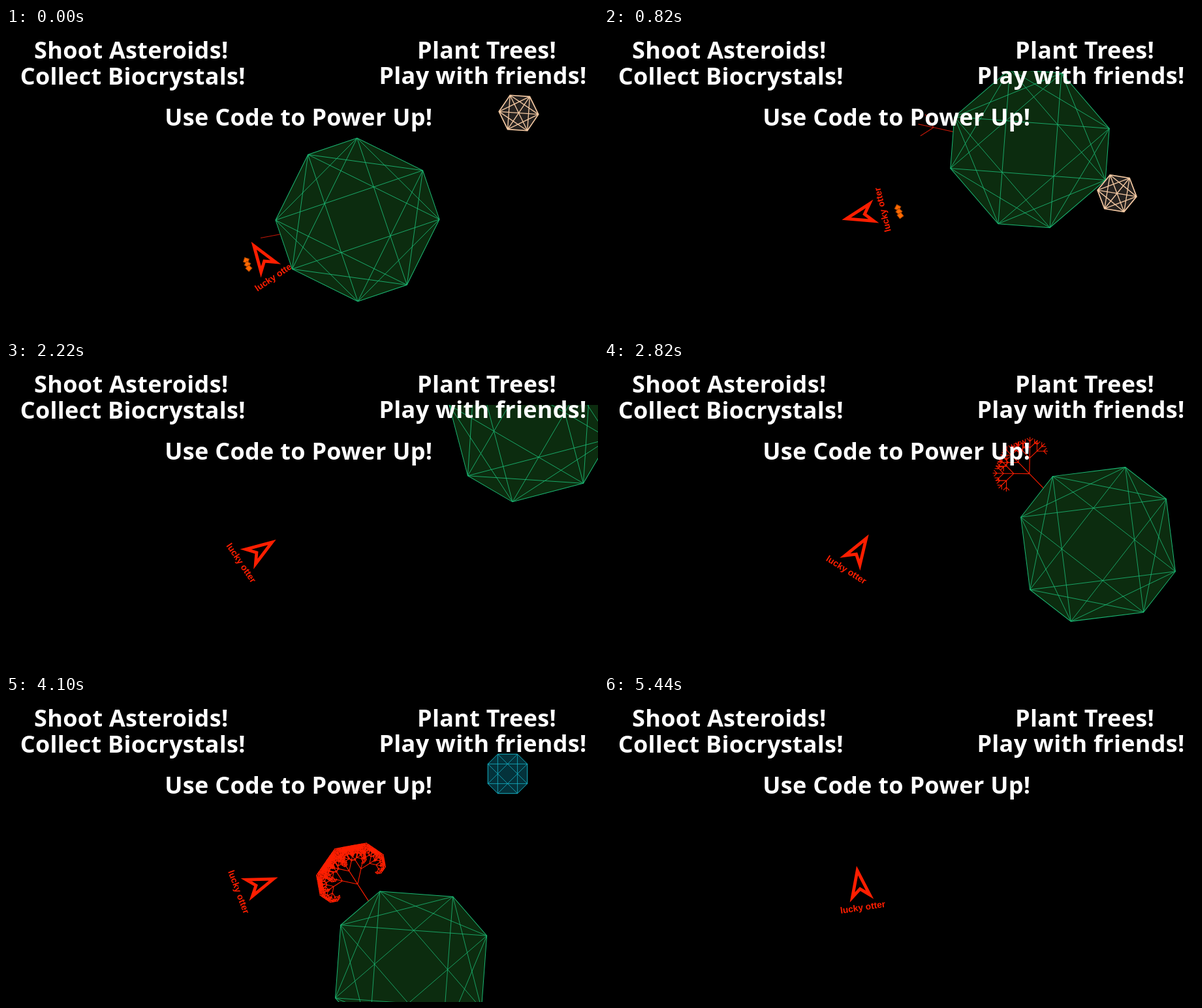
Recreate the animation shown at these times as an HTML page with a canvas. Size 907 by 470 pixels, loop 5.46 s.

```html
<!DOCTYPE html>
<html lang="en">
<head>
<meta charset="utf-8">
<title>Asteroid game</title>
<style>
  html, body { margin: 0; width: 100%; height: 100%; overflow: hidden; background: #000; }
  canvas { display: block; }
</style>
</head>
<body>
<canvas id="stage" width="907" height="470"></canvas>
<script>
const ctx = document.getElementById('stage').getContext('2d');
const WIDTH = 907, HEIGHT = 470, TOP = 66;
const LOOP = 5460, STEP = 20, RAD = Math.PI / 180;
const HIT = 820;            // the rock strikes the planet
const CRYSTAL_IN = 3820;    // the crystal enters from above
const RED = '#ff1e00';

// Waypoints: time, then values.
const planetPath = [
  [0, 538.5, 231.5], [820, 652.5, 185], [1440, 759.8, 138], [2220, 801.8, 92],
  [2820, 757, 280], [3340, 724, 324], [4100, 620.6, 416], [5060, 370, 550], [5440, 345, 700]
];
const shipTurns = [
  [0, -34], [820, -104], [1440, -156], [2220, -304], [3340, -335.5], [4100, -290.5], [5440, -368.5]
];

// Smooth curve through the waypoints, without overshoot.
function follow(points, t) {
  const last = points.length - 1;
  if (t >= points[last][0]) return points[last].slice(1);
  const i = points.findIndex(p => p[0] > t) - 1;
  const a = points[i], b = points[i + 1], h = b[0] - a[0];
  const u = (t - a[0]) / h, w = 1 - u;
  const rate = (n, c) => (points[n + 1][c] - points[n][c]) / (points[n + 1][0] - points[n][0]);
  const slope = (n, c) => {
    const p = rate(Math.max(n - 1, 0), c), q = rate(Math.min(n, last - 1), c);
    return p * q > 0 ? 2 * p * q / (p + q) : 0;
  };
  return a.slice(1).map((v, k) => {
    const c = k + 1;
    return v * (1 + 2 * u) * w * w + b[c] * u * u * (3 - 2 * u)
      + h * (slope(i, c) * u * w * w - slope(i + 1, c) * u * u * w);
  });
}

// The view settles upward at the start.
const settle = t => 63 * Math.max(0, 1 - t / 400) ** 2;

function planetPose(t) {
  const [x, y] = follow(planetPath, t);
  return [x, y + settle(t), 26.3 + 86 * (1 - Math.exp(-t * 0.00038))];
}

function rockPose(t) {
  const turn = 4 + t * 0.0064;
  if (t < HIT) return [785.5, 67.5 + t * 0.2275 + settle(t), turn];
  const drift = (t - HIT) / 620;
  return [786 + 27.5 * drift ** 2.2, 254 + 15 * drift, turn];
}

const crystalPose = t => [768.5 - (t - 4100) * 0.35, 119.5 + (t - 4100) * 0.31, 0];

const octagon = Array.from({ length: 8 }, (_, i) => {
  const angle = (Math.floor(i / 2) * 90 + (i % 2 ? 1 : -1) * 26.565) * RAD;
  return [Math.cos(angle), Math.sin(angle)];
});
const hexagon = Array.from({ length: 6 }, (_, i) => [Math.cos(i * 60 * RAD), Math.sin(i * 60 * RAD)]);

// Filled polygon; each corner is joined to the corners `reach` steps further on.
function gem(shape, radius, [x, y, turn], fill, stroke, width, reach) {
  ctx.save();
  ctx.translate(x, y);
  ctx.rotate(turn * RAD);
  const pts = shape.map(p => [p[0] * radius, p[1] * radius]);
  ctx.beginPath();
  pts.forEach(p => ctx.lineTo(...p));
  ctx.closePath();
  ctx.fillStyle = fill;
  ctx.strokeStyle = stroke;
  ctx.lineWidth = width;
  ctx.fill();
  ctx.stroke();
  ctx.beginPath();
  pts.forEach((p, i) => reach.forEach(step => {
    ctx.moveTo(...p);
    ctx.lineTo(...pts[(i + step) % pts.length]);
  }));
  ctx.lineWidth = width * 0.8;
  ctx.stroke();
  ctx.restore();
}

function fork(x, y, angle, length, depth) {
  if (depth < 1) return;
  for (let side = -1; side <= 1; side++) {
    const dir = angle + side * Math.PI / 4;
    const ex = x + length * Math.cos(dir), ey = y + length * Math.sin(dir);
    ctx.moveTo(x, y);
    ctx.lineTo(ex, ey);
    fork(ex, ey, dir, length * 0.65, depth - 1);
  }
}

function tree(t, [x, y, turn]) {
  const angle = (turn + 143) * RAD, c = Math.cos(angle), s = Math.sin(angle);
  const depth = Math.min(7, Math.floor(t / 580));
  ctx.beginPath();
  ctx.moveTo(x + 112 * c, y + 112 * s);
  ctx.lineTo(x + 151 * c, y + 151 * s);
  fork(x + 151 * c, y + 151 * s, angle, 24, depth);
  ctx.strokeStyle = depth < 4 ? '#c41808' : RED;
  ctx.lineWidth = 1.1;
  ctx.stroke();
}

function flame(x, y, turn) {
  ctx.fillStyle = '#ff6a00';
  ctx.strokeStyle = '#a84300';
  ctx.lineWidth = 1;
  for (let i = -1; i <= 1; i++) {
    ctx.save();
    ctx.translate(x + i * 2, y + i * 6);
    ctx.rotate((turn + i * 12) * RAD);
    ctx.fillRect(-3.5, -3.5, 7, 7);
    ctx.strokeRect(-3.5, -3.5, 7, 7);
    ctx.restore();
  }
}

function ship(t) {
  ctx.save();
  ctx.translate(391, 288 + settle(t));
  ctx.rotate(follow(shipTurns, t)[0] * RAD);
  ctx.beginPath();
  ctx.moveTo(0, -20);
  ctx.lineTo(13.5, 19.5);
  ctx.lineTo(0, 8.5);
  ctx.lineTo(-13.5, 19.5);
  ctx.closePath();
  ctx.strokeStyle = ctx.fillStyle = RED;
  ctx.lineWidth = 4.8;
  ctx.stroke();
  ctx.font = 'bold 13.8px "Liberation Sans", Arial, sans-serif';
  ctx.textAlign = 'center';
  ctx.fillText('lucky otter', 0, 41.5);
  ctx.restore();
}

function captions() {
  ctx.font = 'bold 36px "Open Sans", "Noto Sans", sans-serif';
  ctx.letterSpacing = '0.3px';
  ctx.textAlign = 'center';
  ctx.fillStyle = '#fff';
  ctx.fillText('Shoot Asteroids!', 191.8, 47);
  ctx.fillText('Collect Biocrystals!', 194.3, 87);
  ctx.fillText('Plant Trees!', 736.5, 47);
  ctx.fillText('Play with friends!', 730.5, 86);
  ctx.fillText('Use Code to Power Up!', 448.3, 150);
  ctx.letterSpacing = '0px';
}

function draw(t) {
  ctx.fillStyle = '#000';
  ctx.fillRect(0, 0, WIDTH, HEIGHT);
  ctx.save();
  ctx.beginPath();
  ctx.rect(0, TOP, WIDTH, HEIGHT - TOP);
  ctx.clip();
  if (t < 120) flame(370, 363, 30);
  if (t >= 600 && t < 1000) flame(452, 282, 40);
  ship(t);
  const planet = planetPose(t);
  tree(t, planet);
  gem(octagon, 125.5, planet, '#0c2c0f', '#1bb874', 1, [2, 3]);
  if (t < 2220) gem(hexagon, 30.3, rockPose(t), '#25211f', '#f3c8a2', 1.7, [2, 3]);
  if (t >= CRYSTAL_IN) gem(octagon, 33.8, crystalPose(t), '#04323b', '#16b4c8', 1, [3]);
  ctx.restore();
  captions();
}

const start = performance.now();
function tick() {
  const t = (performance.now() - start) % LOOP;
  draw(Math.floor(t / STEP) * STEP);
  requestAnimationFrame(tick);
}
tick();
</script>
</body>
</html>
```
